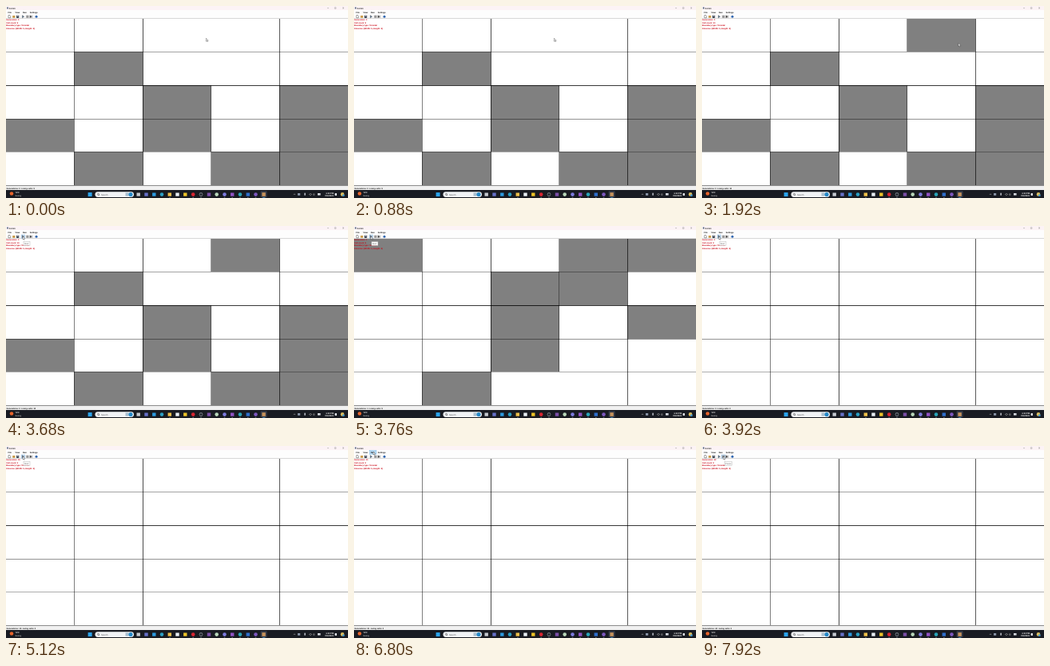
An HTML page that plays this animation: 428 by 240 pixels, repeating every 8 s.

```html
<!DOCTYPE html>
<html lang="en">
<head>
<meta charset="utf-8">
<title>Life</title>
<style>
html, body { margin: 0; width: 100%; height: 100%; overflow: hidden; background: #fff; }
svg { display: block; width: 100vw; height: 100vh; }
text { font-family: "Liberation Sans", Arial, sans-serif; text-rendering: geometricPrecision; white-space: pre; }
</style>
</head>
<body>
<svg id="stage" viewBox="0 0 428 240"></svg>
<script>
const NS = "http://www.w3.org/2000/svg";
const stage = document.getElementById("stage");
const LOOP = 8000, STEP = 80, RUN_AT = 3692, TICK = 102, CLICK_AT = 1920;
const X = [0, 85, 171, 257, 342, 428];
const Y = [16, 57, 99, 141, 182, 224];

function add(tag, attrs, parent = stage) {
  const el = document.createElementNS(NS, tag);
  for (const k in attrs) el.setAttribute(k, attrs[k]);
  return parent.appendChild(el);
}
const rect = (x, y, width, height, fill, more) => add("rect", { x, y, width, height, fill, ...more });
const dot = (cx, cy, r, fill, more) => add("circle", { cx, cy, r, fill, ...more });
const path = (d, stroke, w = 0.5, fill = "none") => add("path", { d, stroke, "stroke-width": w, fill });
function label(x, y, s, fill, size = 2.7, more) {
  const el = add("text", { x, y, fill, "font-size": size, "font-weight": 700, ...more });
  el.textContent = s;
  return el;
}
const show = (el, on) => el.setAttribute("visibility", on ? "visible" : "hidden");
const ink = a => `rgba(0,0,0,${a})`;

// Board: 5 x 5 wrapped Life
function next(g) {
  return g.map((row, r) => row.map((live, c) => {
    let n = -live;
    for (let i = 4; i < 7; i++)
      for (let j = 4; j < 7; j++) n += g[(r + i) % 5][(c + j) % 5];
    return n === 3 || (live && n === 2) ? 1 : 0;
  }));
}
const seed = ["00000", "01000", "00101", "10101", "01011"].map(s => [...s].map(Number));
const clicked = seed.map(r => [...r]);
clicked[0][3] = 1;
const gens = [clicked];
while (gens.length < 4) gens.push(next(gens[gens.length - 1]));

rect(0, 0, 428, 240, "#fff");
const cells = seed.map((row, r) => row.map((_, c) =>
  rect(X[c], Y[r], X[c + 1] - X[c], Y[r + 1] - Y[r], "#808080")));
const seams = seed.map((_, r) => rect(256, Y[r], 1, Y[r + 1] - Y[r], ink(0.4)));
[[1, 0.5], [2, 0.7], [4, 0.65]].forEach(([i, a]) => rect(X[i], 16, 1, 208, ink(a)));
[[1, 0.36], [2, 0.78], [3, 0.42], [4, 0.32]].forEach(([i, a]) => rect(0, Y[i], 428, 1, ink(a)));

// Title, menu, toolbar
rect(0, 0, 428, 5.2, "#fcf3f5");
rect(0, 5.2, 428, 10.8, "#fdfdfd");
rect(0, 15, 428, 1, "#d8d8d8");
rect(1, 1.5, 2, 2, "#6b7a90");
label(3.8, 3.6, "Form1", "#222", 2.6);
path("M402 2.6H404", "#777", 0.4);
path("M411.3 1.7H413V3.4H411.3Z", "#777", 0.35);
path("M421.2 1.6L423 3.4M423 1.6L421.2 3.4", "#666", 0.4);
const menuGlow = rect(19.6, 5.6, 8.4, 4.6, "#b5d9f3", { stroke: "#6aaee0", "stroke-width": 0.4 });
[[2.6, "File"], [11.6, "View"], [21, "Run"], [29.8, "Settings"]].forEach(([x, s]) => label(x, 8.9, s, "#111", 2.5));

const btnGlow = rect(19.2, 11, 4.6, 4.4, "#d6e8f7", { stroke: "#7fb2dd", "stroke-width": 0.4 });
path("M3 11.6H5L5.7 12.3V14.8H3Z", "#444", 0.5, "#fff");
rect(8.2, 12, 3.2, 2.8, "#c99a48");
rect(13, 11.7, 3.2, 3.2, "#3c4554");
rect(13.8, 11.9, 1.6, 1, "#dde");
path("M17.7 11.3V15.2", "#ccc", 0.3);
path("M20.4 11.7L22.7 13.3L20.4 14.9Z", "#333", 0.4, "#68a");
path("M25.9 11.7V14.9M27.6 11.7V14.9", "#333", 0.8);
path("M30 11.8L31.4 13.3L30 14.8ZM32.2 11.7V14.9", "#222", 0.6, "#444");
path("M34.8 11.3V15.2", "#ccc", 0.3);
dot(38, 13.3, 1.5, "#2f66b0");

// Overlay text
const red = (y, s) => label(0.2, y, s, "#c80010", 2.5);
const genText = red(18.1, "");
const countText = red(21.7, "");
red(25.1, "Boundary type: Toroidal");
red(28.5, "Universe: (Width: 5, Height: 5)");

// Status bar
rect(0, 224, 428, 6, "#f0f0f0");
rect(0, 224, 428, 1, "#8c8c8c");
const status = label(0.4, 228.5, "", "#111", 2.5);

// Taskbar
rect(0, 230, 428, 10, "#191b22");
dot(7, 234.5, 2.3, "#e8642c");
label(11.5, 234.4, "74°F", "#fff", 2.5);
label(11.5, 237.6, "Sunny", "#bbb", 2.5);
rect(102.6, 233.1, 5, 5, "#2da5ee");
rect(111.5, 232.2, 48.5, 6.8, "#f1f3f6", { rx: 3.4 });
dot(115.5, 235.4, 1, "none", { stroke: "#222", "stroke-width": 0.5 });
path("M116.2 236.2L117 237", "#222");
label(119, 236.5, "Search", "#555", 2.7, { "font-weight": 400 });
rect(149.5, 233.4, 4, 4.2, "#a9bfd0");
dot(156, 235.6, 2.6, "#2488c8");
[
  [165.7, "#c5c9d0"], [175.5, "#6670c9"], [185.3, "#2d9be0"], [195, "#2b9fc4", 1],
  [204.8, "#f0c04a"], [214.5, "#e8eef4"], [224.3, "#edc428"], [234.2, "#d92532", 1],
  [244, "#8d929c", 1], [254, "#7c4fa8"], [263.7, "#b9d8bb", 1], [273.5, "#7e7be0", 1],
  [283.2, "#9052c4"], [293, "#2aa4b8", 1], [302.8, "#2f6fcc"], [312.5, "#7d57bf", 1]
].forEach(([x, c, round]) => round ? dot(x, 235.6, 2.3, c) : rect(x - 2.2, 233.5, 4.4, 4.2, c));
dot(244, 235.6, 1.7, "#22252d");
rect(318.6, 231.2, 8, 8, "#343a48", { rx: 1 });
rect(320.4, 233.2, 4.4, 4.6, "#c8935c");
[205, 234.2, 244, 273.5, 283.2, 293, 302.8, 312.5].forEach(x => rect(x - 0.8, 239, 1.6, 0.6, "#8d96a8"));
rect(321, 239, 3.4, 0.6, "#58aee8");
path("M359.8 236L361 234.8L362.2 236", "#ccc", 0.5);
rect(365, 234, 3.2, 2.8, "#8a95a8");
rect(373.3, 233.7, 1.6, 3, "#b8bcc6");
path("M379 235.8Q381 233 383 235.8M380.2 236.8Q381 235.7 381.8 236.8", "#ccc", 0.5);
path("M384.7 234.8H386V236.4H384.7Z", "#ccc", 0.4);
rect(390, 234, 3.6, 2.6, "#d5d8de");
label(410, 234.6, "6:32 PM", "#fff", 2.5, { "text-anchor": "end" });
label(410, 237.9, "7/18/2023", "#fff", 2.5, { "text-anchor": "end" });
rect(411.6, 234, 2.3, 3, "#e4e6ea");
dot(421, 235.4, 2.3, "#d8bc60");
dot(422.4, 236.8, 1.3, "#3b9ddd");

// Tooltips
function tip(x, w, s) {
  const g = add("g", {});
  add("rect", { x, y: 19.6, width: w, height: 4.8, fill: "#fafafa", stroke: "#aaa", "stroke-width": 0.4 }, g);
  add("text", { x: x + 0.9, y: 22.9, fill: "#666", "font-size": 2.5 }, g).textContent = s;
  return g;
}
const startTip = tip(22, 8, "Start");
const pauseTip = tip(28.4, 9.2, "Pause");

const cursor = add("path", {
  d: "M0 0V3.9L.9 3.1L1.5 4.4L2.1 4.1L1.5 2.9H2.7Z", fill: "#fff", stroke: "#222", "stroke-width": 0.35
});
const route = [
  [0, 250.4, 40.3], [920, 250.4, 40.3], [1120, 275, 43], [1440, 321.6, 41.2], [1640, 321.6, 41.2],
  [1760, 322, 41.2], [1840, 322, 41.2], [1920, 321, 46.6], [2080, 290, 76], [2240, 210, 92],
  [2480, 95, 50], [2720, 12, 8], [2880, 15, 12], [3040, 21, 13], [5200, 21, 13],
  [5440, 80, 24], [5680, 147, 34], [5840, 120, 28], [6080, 60, 15], [6400, 26, 7],
  [6800, 24, 7], [6960, 24, 10], [7120, 25, 12], [7360, 26.6, 13], [8000, 26.6, 13]
];
function place(t) {
  const i = Math.max(1, route.findIndex(p => p[0] >= t));
  const [a, x, y] = route[i - 1], [b, u, v] = route[i];
  const k = (t - a) / (b - a);
  return [x + (u - x) * k, y + (v - y) * k];
}

function draw(t) {
  const gen = t < RUN_AT ? 0 : Math.floor((t - RUN_AT) / TICK) + 1;
  const board = t < CLICK_AT ? seed : gens[Math.min(gen, 3)];
  const alive = board.flat().reduce((a, b) => a + b);
  board.forEach((row, r) => {
    row.forEach((v, c) => show(cells[r][c], v));
    show(seams[r], row[2] || row[3]);
  });
  genText.textContent = `Generation: ${gen}`;
  countText.textContent = `Cell count: ${alive}`;
  status.textContent = `Generations: ${gen}  Living cells: ${alive}`;

  const overStart = t >= 2960 && t < 5280, overPause = t >= 7200;
  show(btnGlow, overStart || overPause);
  btnGlow.setAttribute("x", overPause ? 24.5 : 19.2);
  show(menuGlow, t >= 6400 && t < 6960);
  show(startTip, t >= 3280 && t < 5280);
  show(pauseTip, t >= 7680);
  cursor.setAttribute("transform", `translate(${place(t)})`);
}

const t0 = performance.now();
function frame() {
  const t = (performance.now() - t0) % LOOP;
  draw(Math.floor(t / STEP) * STEP);
  requestAnimationFrame(frame);
}
frame();
</script>
</body>
</html>
```
